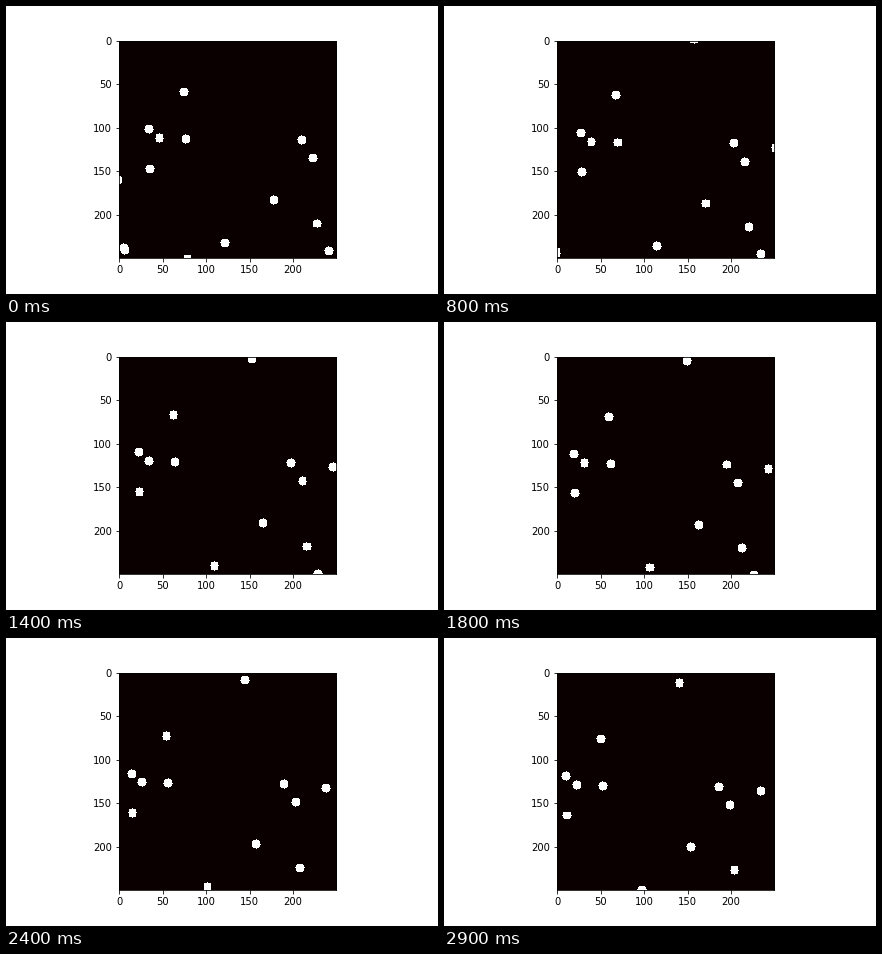
A matplotlib script for the animation above (3000 ms loop, 432x288 px).

```python
import matplotlib.pyplot as plt
import numpy as np
from matplotlib.animation import FuncAnimation

SIZE = 250
RADIUS = 5
FRAMES = 30
VELOCITY = np.array([-0.81, 0.59])  # cells per frame, shared by all discs

# One key point (x, y) per disc; the drift supplies every later place.
STARTS = np.array([
    (74, 59), (34, 102), (46, 112), (76, 113), (35, 147), (-2, 160),
    (164, -5), (209, 114), (257, 119), (222, 135), (177, 183), (227, 210),
    (5, 238), (6, 240), (78, 251), (121, 232), (240, 241),
])

yy, xx = np.mgrid[:SIZE, :SIZE]


def field(step):
    """Binary image of all discs after the given number of steps."""
    centres = STARTS + np.floor(VELOCITY * step)
    grid = np.zeros((SIZE, SIZE))
    for x, y in centres:
        grid[(xx - x) ** 2 + (yy - y) ** 2 <= RADIUS ** 2] = 1
    return grid


fig, ax = plt.subplots(figsize=(6, 4), dpi=72)
fig.subplots_adjust(left=0.125, right=0.9, bottom=0.125, top=0.88)
image = ax.imshow(field(0), cmap="hot", vmin=0, vmax=1,
                  interpolation="nearest")


def update(step):
    image.set_data(field(step))
    return [image]


anim = FuncAnimation(fig, update, frames=FRAMES, interval=100,
                     repeat=True, repeat_delay=0)
plt.show()
```
